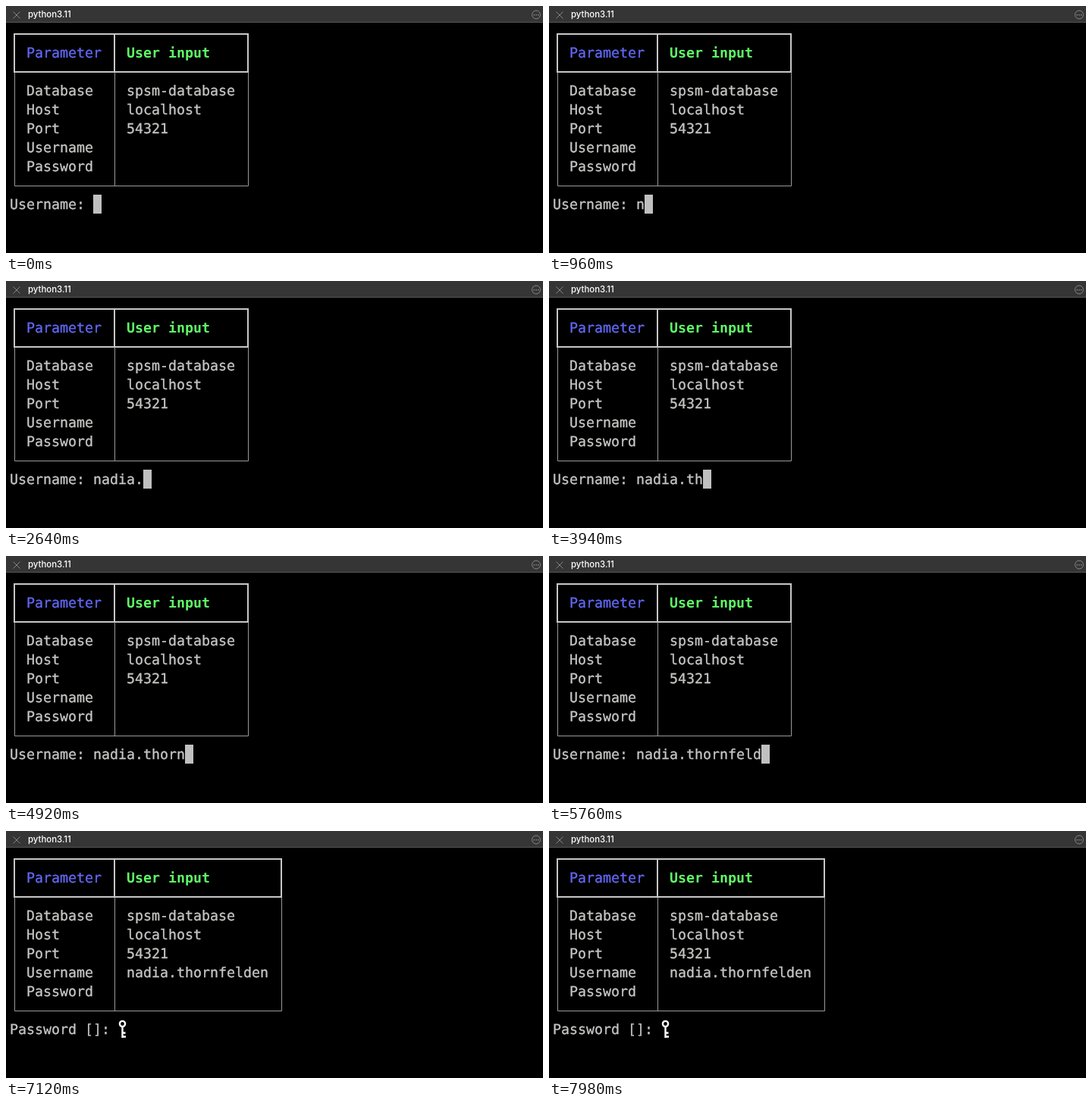
Write an HTML page that moves like this. It is 708 by 326 pixels and loops after 8 s.

```html
<!DOCTYPE html>
<html lang="en">
<head>
<meta charset="utf-8">
<title>Terminal login prompt</title>
<style>
  html, body { margin: 0; width: 100%; height: 100%; overflow: hidden; background: #000; }
  svg { display: block; width: 100vw; height: 100vh; }
  .mono {
    font: 18.271px "DejaVu Sans Mono", "Liberation Mono", monospace;
    fill: #c4c4c2;
    stroke: #c4c4c2;
    stroke-width: 0.35;
    text-rendering: geometricPrecision;
    white-space: pre;
  }
  .mono .param { fill: #6167f2; stroke: #6167f2; }
  .mono .input { fill: #5ff967; stroke: none; font-weight: bold; }
  .title { font: 500 11.4px Inter, "Open Sans", sans-serif; fill: #fff; }
  .icon { fill: none; stroke: #858585; stroke-width: 1; }
  .heavy { fill: none; stroke: #c7c7c7; stroke-width: 2; }
  .thin { fill: none; stroke: #9a9a9a; stroke-width: 1; }
  .key { fill: none; stroke: #fff; stroke-width: 2.4; }
</style>
</head>
<body>
<svg viewBox="0 0 708 326" preserveAspectRatio="none">
  <rect width="708" height="326"/>
  <rect width="708" height="21" fill="#353535"/>
  <rect y="21" width="708" height="1" fill="#555"/>
  <path class="icon" d="M9.5 7.5l9 9m0-9l-9 9"/>
  <text class="title" x="29" y="15">python3.11</text>
  <circle class="icon" cx="699" cy="11.5" r="5.5"/>
  <path d="M695.5 11h1.5v1.5h-1.5zM698.3 11h1.5v1.5h-1.5zM701 11h1.5v1.5h-1.5z" fill="#858585"/>
  <path class="thin" id="body"/>
  <path class="heavy" id="head"/>
  <g class="mono" id="cells"></g>
  <text class="mono" id="prompt" x="5" y="268"></text>
  <rect id="cursor" width="11" height="25" fill="#c0c0c0"/>
  <g class="key" id="key">
    <circle cx="153.5" cy="254.5" r="3.6"/>
    <path d="M153.5 258v15M153.5 266.5h4M153.5 271.5h4.5"/>
  </g>
</svg>
<script>
const LOOP = 8000, COL = 11, ROW = 25, LEFT = 5;
const ENTER = 6720, REDRAW = 6740;
const USER = "nadia.thornfelden";
const KEY_TIMES = [940, 1140, 1340, 1720, 1940, 2340, 2760, 2980,
  4280, 4520, 4740, 5060, 5240, 5440, 5640, 5960, 6220];

const $ = id => document.getElementById(id);
const colX = col => LEFT + col * COL;

function cell(col, row, text, cls = "") {
  const el = document.createElementNS("http://www.w3.org/2000/svg", "text");
  el.setAttribute("x", colX(col));
  el.setAttribute("y", 68 + row * ROW);
  el.setAttribute("class", cls);
  el.textContent = text;
  $("cells").append(el);
  return el;
}

cell(2, 0, "Parameter", "param");
cell(14, 0, "User input", "input");
["Database", "Host", "Port", "Username", "Password"].forEach((s, i) => cell(2, i + 2, s));
["spsm-database", "localhost", "54321"].forEach((s, i) => cell(14, i + 2, s));
const userCell = cell(14, 5, USER);

function show(el, on) {
  el.setAttribute("visibility", on ? "visible" : "hidden");
}

function drawTable(right) {
  $("head").setAttribute("d", `M11 37H${right}V87H11ZM143 37V87`);
  $("body").setAttribute("d", `M11.5 87V237.5H${right + 0.5}V87M143.5 87V237`);
}

function render(t) {
  const entered = t >= ENTER, done = t >= REDRAW;
  const typed = KEY_TIMES.filter(k => k <= t).length;
  drawTable(done ? 363 : 319);
  show(userCell, done);
  show($("key"), done);
  show($("cursor"), !done);
  $("prompt").textContent = done ? "Password []: " : "Username: " + USER.slice(0, typed);
  $("cursor").setAttribute("x", entered ? LEFT : colX(10 + typed));
  $("cursor").setAttribute("y", entered ? 274 : 249);
}

const start = performance.now();
function tick() {
  render((performance.now() - start) % LOOP);
  requestAnimationFrame(tick);
}
tick();
</script>
</body>
</html>
```
